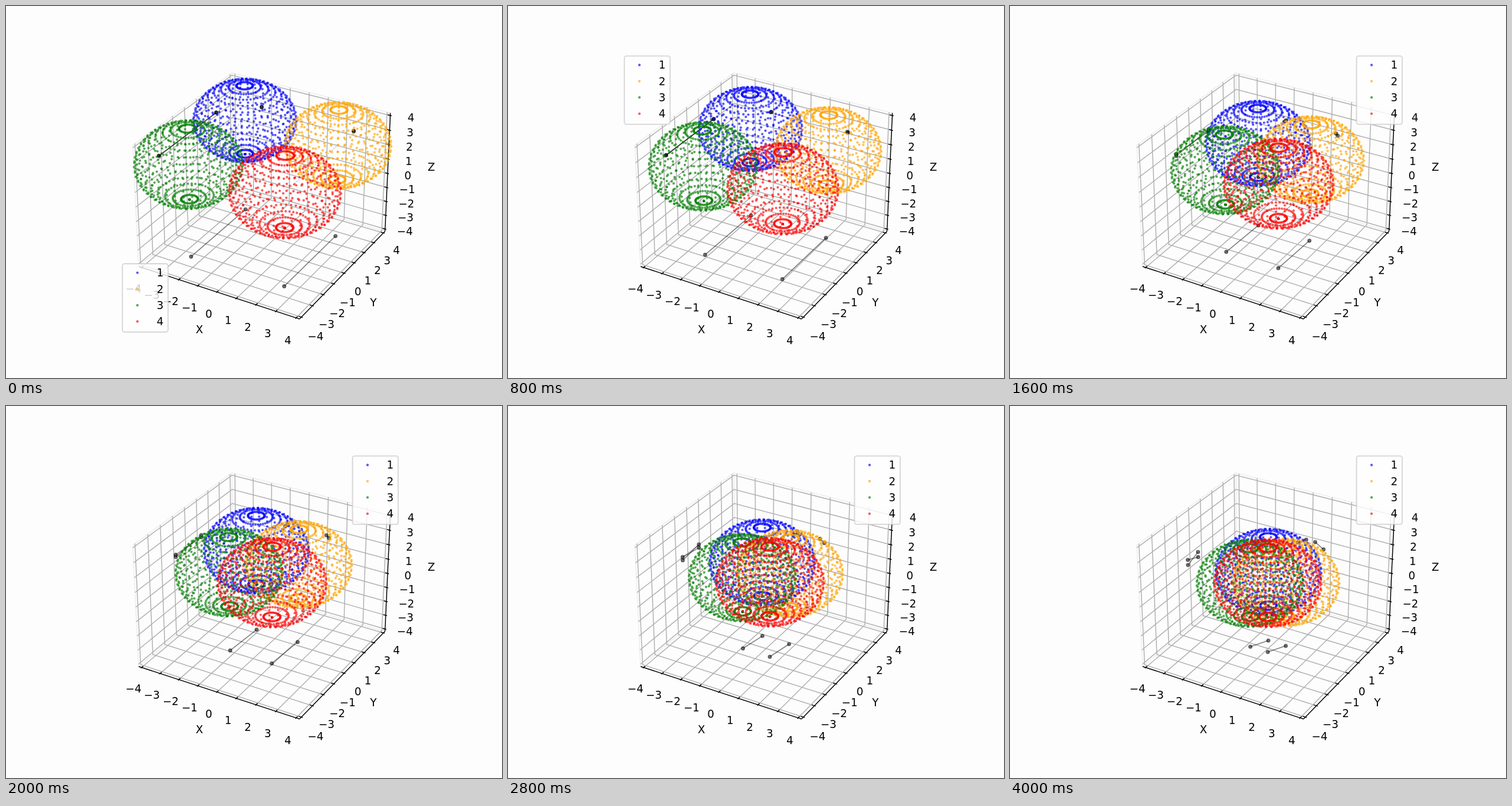
Recreate the animation shown at these times as an HTML page with a canvas. Size 864 by 648 pixels, loop 4.1 s.

```html
<!DOCTYPE html>
<html lang="en">
<head>
<meta charset="utf-8">
<title>Four spheres</title>
<style>
  html, body { margin: 0; width: 100%; height: 100%; overflow: hidden; background: #fdfdfd; }
  svg, canvas { position: absolute; left: 0; top: 0; width: 864px; height: 648px; display: block; }
  text { font: 18.75px "DejaVu Sans", sans-serif; fill: #000; }
</style>
</head>
<body>
<svg id="axes" viewBox="0 0 864 648"></svg>
<canvas id="dots" width="864" height="648"></canvas>
<svg id="top" viewBox="0 0 864 648"><g id="legend"></g></svg>
<script>
const FRAME_MS = 100, FRAMES = 41;
const EDGE = 4 + 1 / 6, RADIUS = 2.4;
const COLORS = ['blue', 'orange', 'green', 'red'];
const RGB = ['0,0,255', '255,165,0', '0,128,0', '255,0,0'];
const C = Math.sqrt(3) / 2;

// Perspective view: elevation 30, azimuth -60, box 4:4:3
function project([X, Y, Z]) {
  const x = X / 7, y = Y / 7, z = Z * 0.75 / 7;
  const depth = 10 - (C / 2 * x - 0.75 * y + 0.5 * z);
  const scale = 2697.08 / depth;
  return [
    449.54 + (C * x + 0.5 * y) * scale,
    320.5 - (-0.25 * x + C / 2 * y + C * z) * scale
  ];
}

// ---- static axes ----
const svg = document.getElementById('axes');
const legend = document.getElementById('legend');

function add(parent, tag, attrs, content) {
  const el = document.createElementNS('http://www.w3.org/2000/svg', tag);
  for (const k in attrs) el.setAttribute(k, attrs[k]);
  if (content !== undefined) el.textContent = content;
  parent.appendChild(el);
}

function line(points, stroke, width = 1.5) {
  const d = points.map(p => project(p).map(v => v.toFixed(2)).join(',')).join(' ');
  add(svg, 'polyline', { points: d, fill: 'none', stroke, 'stroke-width': width });
}

function label(x, y, content) {
  add(svg, 'text', { x, y: y + 6.8, 'text-anchor': 'middle' }, content);
}

function drawAxes() {
  const E = EDGE, pad = 0.102 * 7, padZ = 0.102 * 7 / 0.75;
  const ticks = Array.from({ length: 9 }, (_, i) => i - 4);
  const name = t => String(t).replace('-', '\u2212');

  const pane = '#f0f0f0';
  line([[-E, -E, -E], [-E, E, -E], [-E, E, E], [-E, -E, E], [-E, -E, -E]], pane, 1.9);
  line([[-E, E, E], [E, E, E], [E, E, -E], [-E, E, -E]], pane, 1.9);

  for (const t of ticks) {
    line([[t, -E, -E], [t, E, -E], [t, E, E]], '#b0b0b0');
    line([[E, t, -E], [-E, t, -E], [-E, t, E]], '#b0b0b0');
    line([[-E, -E, t], [-E, E, t], [E, E, t]], '#b0b0b0');
  }

  line([[-E, -E, -E], [E, -E, -E]], '#000');
  line([[E, -E, -E], [E, E, -E]], '#000');
  line([[E, E, -E], [E, E, E]], '#000');

  const out = E + 0.067, inn = E - 0.133;
  for (const t of ticks) {
    line([[t, -out, -E], [t, -inn, -E]], '#000');
    line([[out, t, -E], [inn, t, -E]], '#000');
    line([[out, E, t], [inn, E, t]], '#000');
    const px = project([t, -E - pad, -E - padZ]);
    const py = project([E + pad, t, -E - padZ]);
    const pz = project([E + pad, E + pad, t]);
    label(px[0], px[1] + 0.8, name(t));
    label(py[0], py[1] + 0.8, name(t));
    label(pz[0] - 0.8, pz[1] + 8.3, name(t));
  }
  label(337, 563, 'X');
  label(640, 516, 'Y');
  label(741, 280, 'Z');
}

function drawLegend() {
  add(legend, 'rect', {
    x: 0, y: 0, width: 79.6, height: 119, rx: 3.75,
    fill: '#fff', 'fill-opacity': 0.8,
    stroke: '#ccc', 'stroke-opacity': 0.8, 'stroke-width': 1.9
  });
  COLORS.forEach((c, i) => {
    const y = 15.6 + 28.3 * i;
    add(legend, 'circle', { cx: 26.2, cy: y, r: 2.2, fill: c, 'fill-opacity': 0.65 });
    add(legend, 'text', { x: 59.7, y: y + 6.8 }, i + 1);
  });
}

// ---- motion of the centres ----
const T = [0, 8, 12, 16, 24, 32, 40];
const NEAR_X = [2.44, 2.01, 1.7, 1.33, 0.8, 0.44, 0.24];
const FAR_X = [2.44, 2.05, 1.74, 1.42, 0.97, 0.735, 0.69];
const SIDE_Y = [2.44, 2.03, 1.71, 1.38, 0.865, 0.573, 0.44];
const HIGH_Z = [2.43, 2.23, 2.04, 1.87, 1.43, 1.09, 0.88];
const LOW_Z = [2.43, 2.2, 1.98, 1.75, 1.26, 0.805, 0.52];

// Smooth curve through knots of uneven spacing
function curve(v, f) {
  const n = T.length - 1;
  const rate = i => (v[i + 1] - v[i]) / (T[i + 1] - T[i]);
  const step = i => T[i + 1] - T[i];
  const slope = i => {
    if (i === 0) return rate(0) + (rate(0) - rate(1)) * step(0) / (step(0) + step(1));
    if (i === n) return rate(n - 1) + (rate(n - 1) - rate(n - 2)) / 2;
    return (rate(i - 1) * step(i) + rate(i) * step(i - 1)) / (step(i - 1) + step(i));
  };
  let i = 0;
  while (i < n - 1 && f >= T[i + 1]) i++;
  const h = step(i), u = (f - T[i]) / h, w = 1 - u;
  return w * w * (1 + 2 * u) * v[i] + u * u * (1 + 2 * w) * v[i + 1]
    + h * u * w * (w * slope(i) - u * slope(i + 1));
}

function centres(f) {
  const p = curve(NEAR_X, f), r = curve(FAR_X, f), q = curve(SIDE_Y, f);
  const hi = curve(HIGH_Z, f), lo = curve(LOW_Z, f);
  return [[-p, q, hi], [r, q, lo], [-r, -q, lo], [p, -q, hi]];
}

// ---- sphere points, 9 degrees apart, sorted back to front ----
const ball = [];
for (let i = 0; i < 20; i++) {
  const lat = -Math.PI / 2 + i * Math.PI / 20;
  for (let j = 0; j < 40; j++) {
    const lon = j * Math.PI / 20;
    ball.push([
      RADIUS * Math.cos(lat) * Math.cos(lon),
      RADIUS * Math.cos(lat) * Math.sin(lon),
      RADIUS * Math.sin(lat)
    ]);
  }
}
const nearness = ([x, y, z]) => C / 2 * x - 0.75 * y + 0.375 * z;
ball.sort((a, b) => nearness(a) - nearness(b));

// ---- drawing ----
const ctx = document.getElementById('dots').getContext('2d');
const SPOTS = [[603.6, 87.1], [202.7, 87.1], [202.7, 449]];

function stroke(a, b) {
  ctx.beginPath();
  ctx.moveTo(...a);
  ctx.lineTo(...b);
  ctx.stroke();
}

function disc([x, y], r) {
  ctx.beginPath();
  ctx.arc(x, y, r, 0, 2 * Math.PI);
  ctx.fill();
}

function drawLink(a, b) {
  ctx.strokeStyle = ctx.fillStyle = 'rgba(0,0,0,0.5)';
  ctx.lineWidth = 1.2;
  ctx.setLineDash([1.3, 3]);
  stroke(project(a), project(b));
  ctx.setLineDash([]);

  const walls = [
    ([x, y]) => [x, y, -4],
    ([, y, z]) => [-4, y, z],
    ([x, , z]) => [x, 4, z]
  ];
  for (const wall of walls) {
    const ends = [project(wall(a)), project(wall(b))];
    ctx.lineWidth = 1.6;
    stroke(...ends);
    ctx.lineWidth = 1.6;
    for (const e of ends) {
      disc(e, 2.8);
      ctx.stroke();
    }
  }
}

// The legend takes the first corner that holds the fewest points
function placeLegend(points) {
  const count = ([x, y]) => points.filter(p =>
    p[0] > x && p[0] < x + 79.6 && p[1] > y && p[1] < y + 119).length;
  const hits = SPOTS.map(count);
  const spot = SPOTS[hits.indexOf(Math.min(...hits))];
  legend.setAttribute('transform', `translate(${spot})`);
}

function draw(f) {
  const c = centres(f), points = [];
  ctx.clearRect(0, 0, 864, 648);
  drawLink(c[0], c[2]);
  drawLink(c[1], c[3]);
  c.forEach((o, i) => {
    ctx.fillStyle = `rgba(${RGB[i]},0.65)`;
    for (const b of ball) {
      const p = project([o[0] + b[0], o[1] + b[1], o[2] + b[2]]);
      points.push(p);
      disc(p, 2.15);
    }
  });
  placeLegend(points);
}

drawAxes();
drawLegend();

let shown = -1;
const start = performance.now();
function tick() {
  const f = Math.floor((performance.now() - start) / FRAME_MS) % FRAMES;
  if (f !== shown) draw(shown = f);
  requestAnimationFrame(tick);
}
tick();
</script>
</body>
</html>
```
